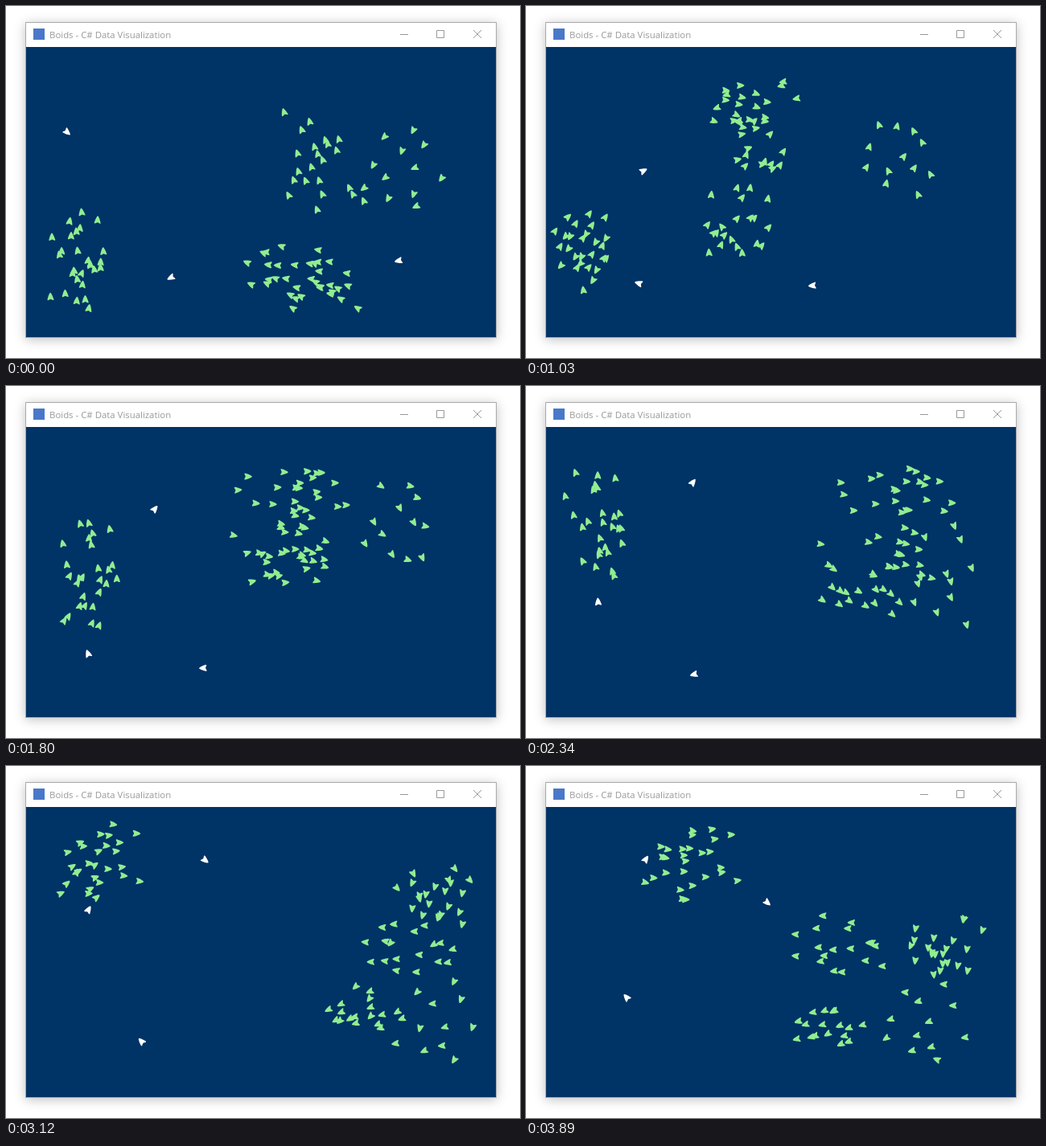
Recreate the animation shown at these times as an HTML page with a canvas. Size 639x438 px, loop 3.97 s.

```html
<!DOCTYPE html>
<html lang="en">
<head>
<meta charset="utf-8">
<title>Boids</title>
<style>
html, body { margin: 0; width: 100%; height: 100%; overflow: hidden; background: #fff; }
canvas { display: block; }
</style>
</head>
<body>
<canvas id="stage" width="639" height="438"></canvas>
<script>
const ctx = document.getElementById('stage').getContext('2d');
const LOOP = 3970, FIRST = 70, STEP = 77.9; // ms
const KEYS = [0, 7, 13, 23, 36, 50]; // steps at which a path passes its points
const GOLDEN = Math.PI * (3 - Math.sqrt(5));

let seed = 41;
function random() {
  seed = (seed * 16807) % 2147483647;
  return seed / 2147483647;
}
const spread = range => (random() * 2 - 1) * range;
const clamp = (v, low, high) => Math.max(low, Math.min(high, v));

// The simulation redraws at discrete steps.
const stepAt = ms => Math.max(0, Math.floor((ms - FIRST) / STEP) + 1);

function slope(path, i, axis) {
  const a = Math.max(0, i - 1), b = Math.min(KEYS.length - 1, i + 1);
  return (path[b][axis] - path[a][axis]) / (KEYS[b] - KEYS[a]);
}

// Smooth cubic through the points, continued straight beyond both ends.
function along(path, step, axis) {
  const last = KEYS.length - 1;
  if (step < 0) return path[0][axis] + slope(path, 0, axis) * step;
  if (step > KEYS[last]) return path[last][axis] + slope(path, last, axis) * (step - KEYS[last]);
  let i = 0;
  while (i < last - 1 && step >= KEYS[i + 1]) i++;
  const span = KEYS[i + 1] - KEYS[i];
  const u = (step - KEYS[i]) / span, v = 1 - u;
  return path[i][axis] * v * v * (1 + 2 * u) + path[i + 1][axis] * u * u * (3 - 2 * u)
    + span * (slope(path, i, axis) * u * v * v - slope(path, i + 1, axis) * u * u * v);
}

const boids = [];

// Members fill an ellipse evenly, and lead or trail the flock along its path.
function flock(count, rx, ry, lag, path) {
  for (let i = 0; i < count; i++) {
    const r = Math.sqrt((i + 0.5) / count), a = i * GOLDEN;
    boids.push({
      path,
      dx: rx * r * Math.cos(a) + spread(5),
      dy: ry * r * Math.sin(a) + spread(5),
      lag: spread(lag),
      sway: 3 + random() * 4,
      phase: random() * Math.PI * 2,
      turn: spread(0.4),
      color: '#90ee90'
    });
  }
}

function predator(path) {
  boids.push({ path, dx: 0, dy: 0, lag: 0, sway: 0, phase: 0, turn: 0, color: '#fff' });
}

flock(27, 34, 48, 4, [[90, 318], [88, 280], [66, 310], [105, 235], [88, 128], [205, 120]]);
flock(22, 46, 34, 3, [[388, 205], [350, 115], [262, 125], [355, 130], [525, 140], [515, 225]]);
flock(18, 48, 34, 3, [[370, 345], [275, 290], [285, 185], [360, 190], [520, 225], [390, 225]]);
flock(17, 50, 26, 3, [[375, 330], [280, 315], [255, 285], [345, 220], [450, 295], [375, 325]]);
flock(12, 50, 55, 3, [[490, 200], [480, 215], [460, 180], [490, 170], [535, 305], [490, 320]]);

predator([[76, 157], [114, 191], [146, 205], [185, 153], [229, 107], [300, 170]]);
predator([[205, 338], [170, 355], [140, 345], [102, 333], [91, 208], [149, 116]]);
predator([[488, 317], [420, 333], [356, 348], [245, 351], [186, 357], [125, 288]]);

// Closed cardinal spline through the outline of an arrowhead that points right.
function arrowhead() {
  const pts = [[0, 0], [-1, 4], [8, 0], [-1, -4], [0, 0]];
  const at = i => pts[(i + pts.length) % pts.length];
  const shape = new Path2D();
  shape.moveTo(0, 0);
  pts.forEach((p, i) => {
    const before = at(i - 1), next = at(i + 1), after = at(i + 2);
    shape.bezierCurveTo(
      p[0] + (next[0] - before[0]) / 6, p[1] + (next[1] - before[1]) / 6,
      next[0] - (after[0] - p[0]) / 6, next[1] - (after[1] - p[1]) / 6,
      next[0], next[1]);
  });
  shape.closePath();
  return shape;
}
const arrow = arrowhead();

function place(boid, step) {
  const angle = boid.phase + boid.turn * step;
  return [
    along(boid.path, step - boid.lag, 0) + boid.dx + boid.sway * Math.cos(angle),
    along(boid.path, step - boid.lag, 1) + boid.dy + boid.sway * Math.sin(angle)
  ];
}

function drawBoid(boid, step) {
  const [x, y] = place(boid, step);
  const [x0, y0] = place(boid, step - 0.2);
  const [x1, y1] = place(boid, step + 0.2);
  ctx.save();
  ctx.translate(clamp(x, 36, 580), clamp(y, 56, 376));
  ctx.rotate(Math.atan2(y1 - y0, x1 - x0));
  ctx.translate(-3, 0);
  ctx.fillStyle = boid.color;
  ctx.fill(arrow);
  ctx.restore();
}

function rect(color, x, y, w, h) {
  ctx.fillStyle = color;
  ctx.fillRect(x, y, w, h);
}

function drawWindow() {
  rect('#fff', 0, 0, 639, 438);
  ctx.save();
  ctx.shadowColor = 'rgba(0,0,0,0.25)';
  ctx.shadowBlur = 13;
  ctx.shadowOffsetY = 2;
  rect('#aaa', 24, 20, 586, 393);
  ctx.restore();
  rect('#fff', 25, 21, 584, 30);
  rect('#003366', 25, 51, 584, 361);
  rect('#4a78c8', 34, 28, 14, 14);

  ctx.fillStyle = '#999';
  ctx.font = '11.4px "Open Sans", sans-serif';
  ctx.fillText('Boids - C# Data Visualization', 54, 40);

  ctx.strokeStyle = '#999';
  ctx.lineWidth = 1;
  ctx.beginPath();
  ctx.moveTo(490, 35.5);
  ctx.lineTo(500, 35.5);
  ctx.rect(535.5, 30.5, 9, 9);
  ctx.moveTo(581, 30);
  ctx.lineTo(591, 40);
  ctx.moveTo(591, 30);
  ctx.lineTo(581, 40);
  ctx.stroke();
}

function draw(ms) {
  const step = stepAt(ms);
  drawWindow();
  ctx.save();
  ctx.beginPath();
  ctx.rect(25, 51, 584, 361);
  ctx.clip();
  boids.forEach(boid => drawBoid(boid, step));
  ctx.restore();
}

const start = performance.now();
function tick() {
  draw((performance.now() - start) % LOOP);
  requestAnimationFrame(tick);
}
tick();
</script>
</body>
</html>
```
